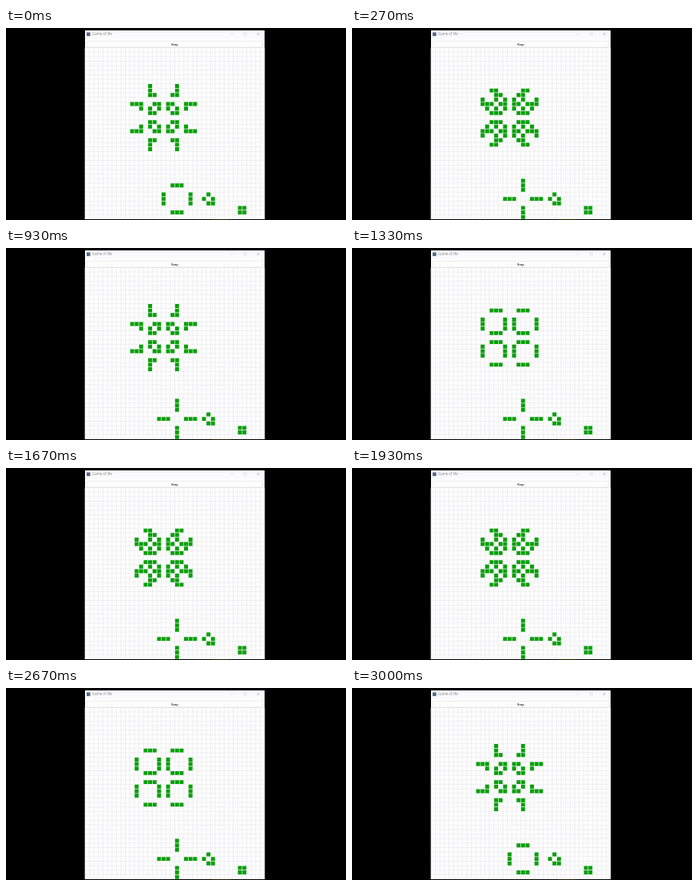
Write an HTML page that moves like this. It is 426 px wide and 240 px high and loops after 3070 ms.

```html
<!DOCTYPE html>
<html lang="en">
<head>
<meta charset="utf-8">
<title>Game of life</title>
<style>
  html, body { margin: 0; width: 100%; height: 100%; overflow: hidden; background: #000; }
  svg { display: block; width: 100vw; height: 100vh; }
  text { font-family: "Open Sans", "Noto Sans", sans-serif; }
</style>
</head>
<body>
<svg viewBox="0 0 426 240">
  <rect x="99" y="3" width="225" height="236" fill="#fdfdfd"/>
  <rect x="99" y="3" width="225" height="10" fill="#fafafd"/>
  <rect x="101" y="5.5" width="4.6" height="4.6" fill="#56688a"/>
  <text x="108" y="9.4" font-size="4.4" fill="#858585">Game of life</text>
  <path d="M281.5 7.8h3M298.2 6.3h3v3h-3z" fill="none" stroke="#d0d0d0" stroke-width=".5"/>
  <path d="M314.6 6.2l3 3m0-3l-3 3" stroke="#888" stroke-width=".5"/>
  <rect x="101.2" y="16.6" width="219.8" height="7.6" fill="#fdfdfd" stroke="#e6e6e6" stroke-width=".6"/>
  <path d="M101 24.3h220" stroke="#c8c8c8" stroke-width=".6"/>
  <text x="211.4" y="22" font-size="4" font-weight="600" text-anchor="middle" fill="#222">Stop</text>
  <path id="grid" fill="none" stroke="#e7e7ec" stroke-width=".6"/>
  <path d="M258 238.7h23" stroke="#e9e2a4" stroke-width=".6"/>
  <path id="cells" fill="#06a006"/>
</svg>
<script>
const LOOP = 3070, FRAMES = 46, FRAME_MS = 200 / 3;
const STEP_MS = 250, FIRST_STEP = 133, START_GEN = 4, PERIOD = 6;
const COLS = 40, ROWS = 38, LEFT = 99, TOP = 24.5, PX = 5.625, PY = 5.645, SIZE = 4.95;

const key = (c, r) => r * COLS + c;

function seed() {
  const live = new Set();
  // Patterns are placed relative to the pulsar's corner.
  const add = (c, r) => live.add(key(c + 10, r + 8));
  for (const a of [1, 6, 8, 13])
    for (const b of [3, 4, 5, 9, 10, 11]) { add(a, b); add(b, a); }
  for (const d of [-1, 0, 1])
    for (const s of [-3, 3]) { add(10 + d, 25 + s); add(10 + s, 25 + d); }
  for (const [c, r] of [[17, 24], [16, 25], [18, 25], [17, 26], [18, 26]]) add(c, r);
  for (const c of [24, 25]) for (const r of [27, 28]) add(c, r);
  return live;
}

function evolve(live) {
  const next = new Set();
  for (let r = 0; r < ROWS; r++)
    for (let c = 0; c < COLS; c++) {
      let n = 0;
      for (let y = Math.max(0, r - 1); y <= Math.min(ROWS - 1, r + 1); y++)
        for (let x = Math.max(0, c - 1); x <= Math.min(COLS - 1, c + 1); x++)
          if ((x !== c || y !== r) && live.has(key(x, y))) n++;
      if (n === 3 || (n === 2 && live.has(key(c, r)))) next.add(key(c, r));
    }
  return next;
}

function toPath(live) {
  let d = "";
  for (const k of live) {
    const x = LEFT + (k % COLS + .5) * PX - SIZE / 2;
    const y = TOP + (Math.floor(k / COLS) + .5) * PY - SIZE / 2;
    d += `M${x.toFixed(2)} ${y.toFixed(2)}h${SIZE}v${SIZE}h-${SIZE}z`;
  }
  return d;
}

let lines = "";
for (let c = 0; c <= COLS; c++) lines += `M${LEFT + c * PX} ${TOP}V239`;
for (let r = 0; r < ROWS; r++) lines += `M${LEFT} ${TOP + r * PY}H324`;
document.getElementById("grid").setAttribute("d", lines);

const paths = [];
for (let g = 0, live = seed(); g < PERIOD; g++, live = evolve(live)) paths.push(toPath(live));

const cells = document.getElementById("cells");
const t0 = performance.now();
let shown = -1;

function draw() {
  const t = (performance.now() - t0) % LOOP;
  const frame = Math.floor(t / LOOP * FRAMES);
  const steps = Math.floor((frame * FRAME_MS - FIRST_STEP) / STEP_MS) + 1;
  const gen = (START_GEN + steps) % PERIOD;
  if (gen !== shown) cells.setAttribute("d", paths[shown = gen]);
  requestAnimationFrame(draw);
}
draw();
</script>
</body>
</html>
```
